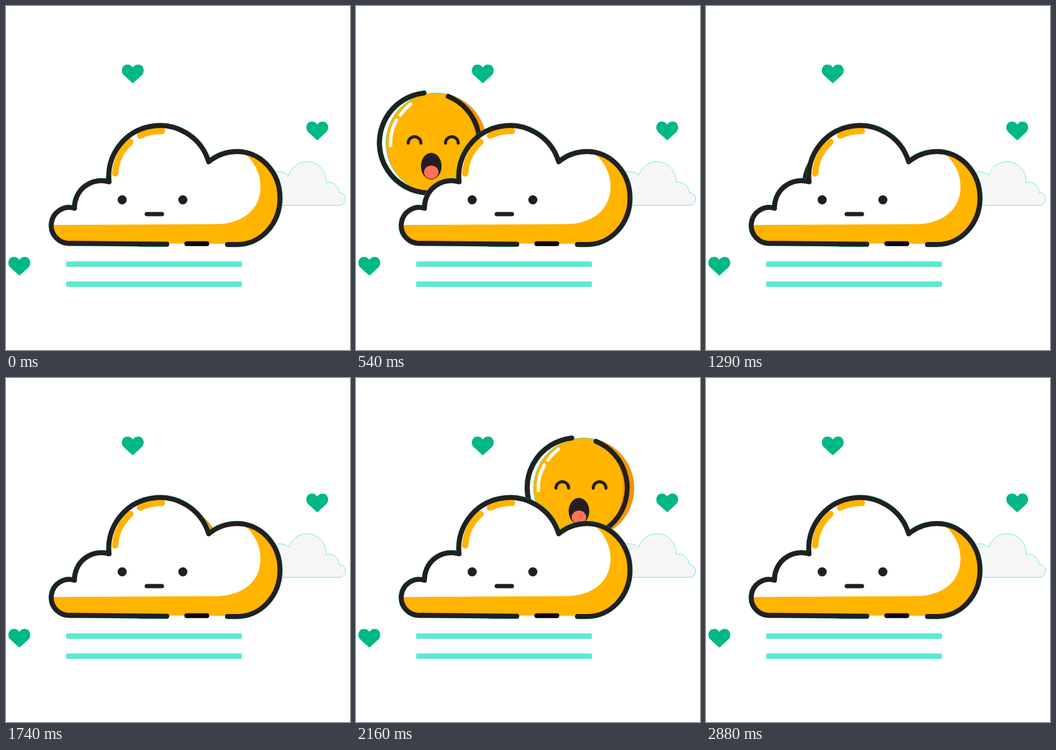
These frames come from a looping animation (567x567 px, 3.3 s). An HTML page:

```html
<!DOCTYPE html>
<html lang="en">
<head>
<meta charset="utf-8">
<title>Sun behind a cloud</title>
<style>
html, body { margin: 0; width: 100%; height: 100%; overflow: hidden; background: #fff; }
svg { display: block; width: 100vw; height: 100vh; }
.ink { fill: none; stroke: #231f20; stroke-width: 8; stroke-linecap: round; stroke-linejoin: round; }
.edge { fill: none; stroke: #00b886; stroke-width: 8.8; stroke-linecap: round; }
.shine { fill: none; stroke: #fff; stroke-width: 5.5; stroke-linecap: round; }
</style>
</head>
<body>
<svg viewBox="0 0 567 567">
  <defs>
    <path id="heart" fill="#00b886" d="M0 15.5L-15.3 1.5C-20.5 -4 -18 -15.5 -9 -15.5C-4.5 -15.5 -1.5 -13.5 0 -10.5C1.5 -13.5 4.5 -15.5 9 -15.5C18 -15.5 20.5 -4 15.3 1.5Z"/>
    <path id="ring" d="M112 143.5A82.5 82.5 0 1 0 152 149"/>
    <path id="outline" d="M265 392.5L107 391A29.5 29.5 0 1 1 113 333.5A44 44 0 0 1 170 290A84 84 0 0 1 334 257A73.5 73.5 0 0 1 381 240A70.5 76.5 0 0 1 381 393H365"/>
  </defs>

  <use href="#heart" x="209" y="112"/>
  <use href="#heart" x="513" y="206"/>
  <use href="#heart" x="22" y="429"/>
  <g fill="#5fe8d1">
    <rect x="99" y="421" width="290" height="9" rx="2.5"/>
    <rect x="99" y="454" width="290" height="9" rx="2.5"/>
  </g>
  <path fill="#f6f6f6" stroke="#5fe8d1" stroke-width=".9" d="M440 328.5V275Q456 270 466 279A31.5 31.5 0 0 1 527.5 291A17 17 0 0 1 549 307.5A10.7 10.7 0 0 1 552 328.5Z"/>

  <g id="sun">
    <use href="#ring" class="edge"/>
    <circle cx="132" cy="226" r="82.8" fill="#ffb400" stroke="#3fd9b8" stroke-width=".8"/>
    <path fill="#ff9300" d="M152 145.5A83 83 0 0 1 152 306.5A94.5 94.5 0 0 0 152 145.5Z"/>
    <path class="shine" d="M57 230A75 75 0 0 1 67 188M73 180A75 75 0 0 1 90 162"/>
    <use href="#ring" class="ink"/>
    <path class="ink" style="stroke-width:5" d="M86 226A10.5 10.5 0 0 1 107 226M147.5 226A10.5 10.5 0 0 1 168.5 226"/>
    <ellipse cx="124" cy="264" rx="17" ry="22" fill="#231f20"/>
    <ellipse cx="124" cy="274" rx="12" ry="11" fill="#ff7058"/>
  </g>

  <use href="#outline" class="edge"/>
  <path stroke="#00b886" d="M219 396.5H267"/>
  <use href="#outline" fill="#fff"/>
  <path fill="#ffb400" d="M390 241C408 254 419.5 275 419.5 298C419.5 335 390 359.5 346 359.5L78 361A29.5 29.5 0 0 0 107 391L381 392A70.5 76 0 0 0 390 241Z"/>
  <path fill="none" stroke="#ffb400" stroke-width="10.5" stroke-linecap="round" d="M180 276A73.5 73.5 0 0 1 205 224M221 213.5A73.5 73.5 0 0 1 257 206"/>
  <use href="#outline" class="ink"/>
  <path class="ink" style="stroke:#080707" d="M298 391.8H331"/>
  <path class="ink" style="stroke-width:7" d="M232 343H257"/>
  <g fill="#231f20"><circle cx="191.5" cy="319.5" r="7.5"/><circle cx="291.5" cy="319.5" r="7.5"/></g>
</svg>
<script>
const LOOP = 3300, STEP = 30;
// start, end, from x, from y, to x, to y
const moves = [
  [0, 540, 128, 76.5, 0, 0],
  [540, 900, 0, 0, 0, 0],
  [900, 1320, 0, 0, 133, 79],
  [1710, 1980, 133, 75, 198, 5],
  [1980, 2160, 198, 5, 243.5, -44.5],
  [2160, 2580, 243.5, -44.5, 243.5, -44.5],
  [2580, 2880, 243.5, -44.5, 118.5, 75.5]
];
const sun = document.getElementById('sun');
const begin = performance.now();

function draw() {
  const elapsed = (performance.now() - begin) % LOOP;
  const t = Math.floor(elapsed / STEP) * STEP;
  const move = moves.find(([start, end]) => t >= start && t < end);
  sun.style.display = move ? '' : 'none';
  if (move) {
    const [start, end, x0, y0, x1, y1] = move;
    const p = (t - start) / (end - start);
    sun.setAttribute('transform', `translate(${x0 + (x1 - x0) * p} ${y0 + (y1 - y0) * p})`);
  }
  requestAnimationFrame(draw);
}
draw();
</script>
</body>
</html>
```
